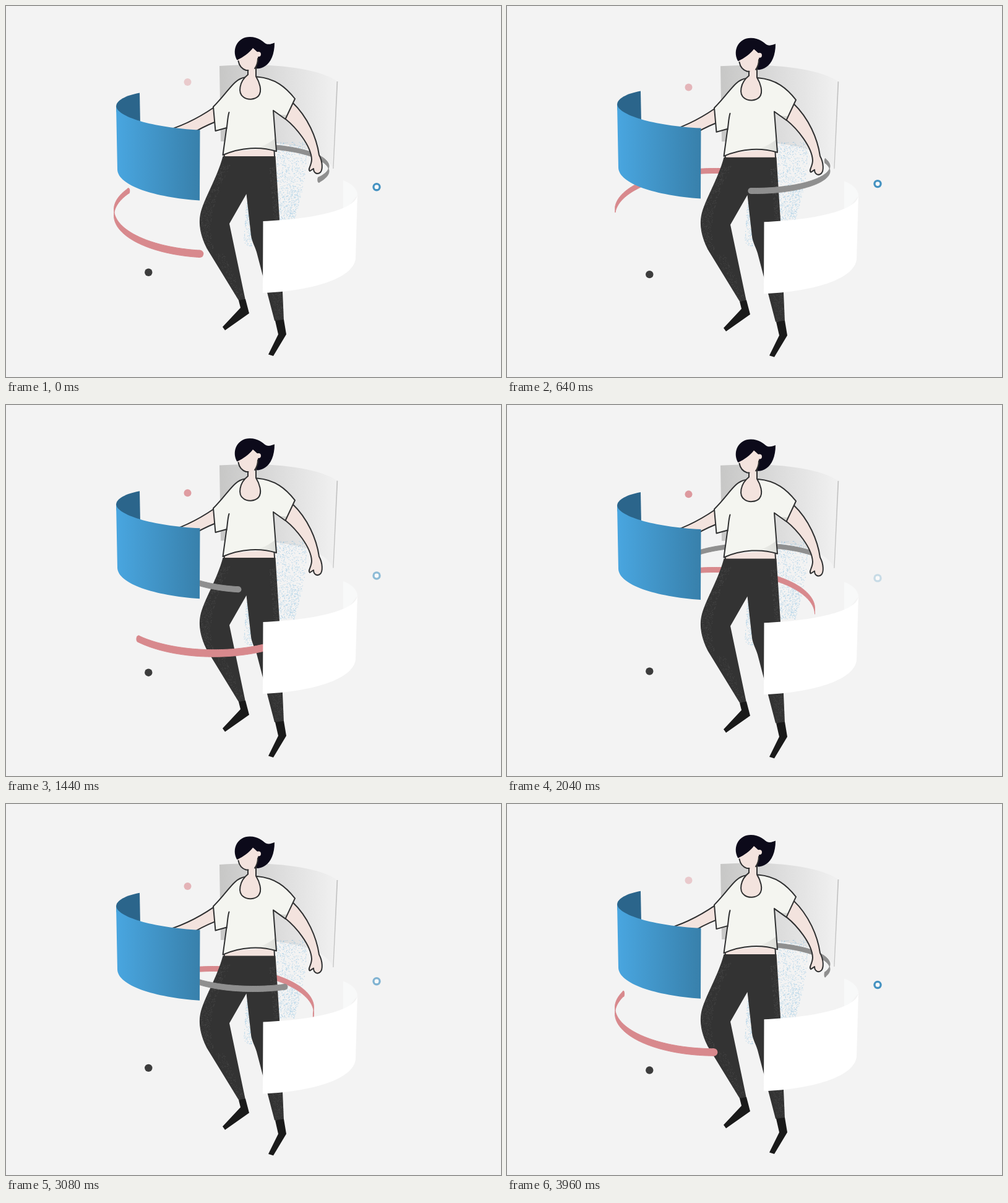
Recreate the animation shown at these times as an HTML page with a canvas. Size 800x600 px, loop 4 s.

```html
<!DOCTYPE html>
<html lang="en">
<head>
<meta charset="utf-8">
<title>Floating figure</title>
<style>
html, body { margin: 0; width: 100%; height: 100%; overflow: hidden; background: #f3f3f3; }
canvas { display: block; }
</style>
</head>
<body>
<canvas id="stage" width="800" height="600"></canvas>
<script>
const ctx = document.getElementById('stage').getContext('2d');
const LOOP = 4000, INK = '#2f3031', SKIN = '#f3e3de', BACKDROP = '#f3f3f3';

const shapes = Object.fromEntries(Object.entries({
  panel: 'M345 97C420 92 500 98 536 122L529 263C516 233 460 216 347 219Z',
  panelEdge: 'M534.5 122L536.3 122L529.5 263L528.3 263Z',
  blueInner: 'M216 141C194 145 178 153 178 163L178.5 172L217 192Z',
  blueOuter: 'M178 162C178 179 236 197.5 313.5 201L313 315C240 310 181 291 180 265Z',
  whiteInner: 'M545 282C556 286 568 294 568 306L545 335Z',
  whiteOuter: 'M415.5 348C490 345 568 331 568 304L565 408C562 442 490 461 415 464Z',
  leftArm: 'M250 204C290 194 320 175 336 164L339 187C322 194 310 200 298 208',
  rightArm: 'M463 156C488 180 502 213 506 241C512 252 512 265 508 269C504 273 497 271 497 263L491 267C487 264 494 258 494 248C493 225 468 196 452 183',
  belly: 'M352 236L353 244L434 244L433 230Z',
  bellySides: 'M352 238L353 243M434 243L433.5 234',
  pants: 'M350.5 243L435.5 243L442 345L449 509L434 509L405 398C402 388 397 380 396 371L388.5 304L361 352L387 476L376 476L327 396C314 374 311 352 314 337C319 313 341 279 350.5 243Z',
  feet: 'M376 476L387 474L393 497L354 524.5L350 519L379 488ZM435 509L449 507L453 531L432 566L424 563.5L440 531Z',
  shirt: 'M386 115.5C368 118 360 138 335 163L338.5 202L356.5 197L350.5 241C380 228 412 227 437 235L432 169L451.5 183L467 150C452 131 435 117 406 114.5Z',
  crease: 'M360.5 172C358 180 358 190 356.5 198',
  sleeveShade: 'M432 168L451 182L454 176Q440 178 432 168Z',
  hemShade: 'M408 229Q427 222 436 213L437 235Q422 230 408 229Z',
  neck: 'M391 101L391 111C377 122 374 141 384 147.5C390 152 402 152 408 145.5C415 137 409 122 404 114L404 99Z',
  hair: 'M373 87C364 69 375 50 394 50C408 50 414 57 420 61C425 63 430 61 434 59.5C434 78 428 91 419 97C413 101 408 102 404 101L390 90Z',
  face: 'M374.5 87C383 83 393 76 399 68C402 70 404 73 407 75C408 88 406 96 402 101C398 104 393 105 388 104C381 101 376 96 374.5 87Z',
  jaw: 'M375.5 89C377 97 382 102 388 104L391.5 104M407 85C407 90 405 97 402 101'
}).map(([name, d]) => [name, new Path2D(d)]));

const pinkRing = { cx: 336, cy: 334, rx: 161.5, ry: 67.5, front: 12.5, back: 9, color: '#d8898d' };
const grayRing = { cx: 400, cy: 263, rx: 122, ry: 36, front: 10, back: 8, color: '#8f8f8f' };
const ARC = 113;

// Swings linearly between two values, reached at the given times of the loop.
function swing(t, lowAt, low, highAt, high) {
  const rise = (highAt - lowAt + LOOP) % LOOP, since = (t - lowAt + LOOP) % LOOP;
  const u = since < rise ? since / rise : (LOOP - since) / (LOOP - rise);
  return low + (high - low) * u;
}

// Leading angle of each ring: two accelerating laps and three eased laps.
const grayLead = u => 30 + 720 * u ** (4 / 3);
const pinkLead = u => 211 + 1080 * (u - .07 * Math.sin(2 * Math.PI * u) - .044 * Math.sin(Math.PI * u));

function gradient(x0, x1, ...colors) {
  const g = ctx.createLinearGradient(x0, 0, x1, 0);
  colors.forEach((c, i) => g.addColorStop(i / (colors.length - 1), c));
  return g;
}
const panelFill = gradient(345, 536, '#c7c7c6', '#dcdcdc', '#f1f1f1');
const blueFill = gradient(178, 313, '#49a6e0', '#3880ab');
const hemFill = gradient(408, 437, '#f0f1ec', '#dcddd9');

let seed = 7;
function random() {
  seed = (seed * 16807) % 2147483647;
  return seed / 2147483647;
}
// Dots in a band whose left edge and width depend on the height.
function scatter(count, top, bottom, left, width) {
  const dots = new Path2D();
  for (let i = 0; i < count; i++) {
    const v = random();
    dots.rect(left(v) + width(v) * random(), top + (bottom - top) * v, 1, 1);
  }
  return dots;
}
const blueGrain = [
  scatter(850, 220, 346, () => 437, v => 50 - 22 * v * v),
  scatter(150, 318, 388, v => 388 - 5 * v, v => 4 + 11 * v)
];
const pantsGrain = [
  scatter(420, 256, 400, v => 345 - 32 * Math.sin(v * 2.2), () => 18),
  scatter(170, 260, 346, v => 425 + 8 * v, () => 10),
  scatter(130, 400, 474, v => 338 + 34 * v, () => 14),
  scatter(130, 462, 506, v => 428 + 8 * v, () => 16)
];

function fill(shape, color) {
  ctx.fillStyle = color;
  ctx.fill(shapes[shape]);
}
function outline(shape, color) {
  if (color) fill(shape, color);
  ctx.stroke(shapes[shape]);
}
function sprinkle(grain, color) {
  ctx.fillStyle = color;
  grain.forEach(dots => ctx.fill(dots));
}
function shifted(y, paint) {
  ctx.save();
  ctx.translate(0, y);
  paint();
  ctx.restore();
}
function circle(x, y, r, color, alpha = 1) {
  ctx.globalAlpha = Math.min(1, alpha);
  ctx.fillStyle = color;
  ctx.beginPath();
  ctx.arc(x, y, r, 0, 7);
  ctx.fill();
  ctx.globalAlpha = 1;
}

// A vertical ribbon along an ellipse; one call paints its near or far half.
function ribbon(ring, lead, near) {
  const points = [];
  for (let i = 0; i <= 90; i++) {
    const a = (lead - ARC * i / 90) * Math.PI / 180, s = Math.sin(a);
    points.push({
      x: ring.cx + ring.rx * Math.cos(a),
      y: ring.cy + ring.ry * s,
      half: (ring.front + ring.back + (ring.front - ring.back) * s) / 4,
      turn: Math.abs(s)
    });
  }
  ctx.save();
  ctx.beginPath();
  ctx.rect(0, near ? ring.cy : 0, 800, near ? 600 : ring.cy);
  ctx.clip();
  ctx.fillStyle = ctx.strokeStyle = ring.color;
  ctx.lineWidth = 1;
  ctx.beginPath();
  points.forEach(p => ctx.lineTo(p.x, p.y - p.half + .5));
  points.reverse().forEach(p => ctx.lineTo(p.x, p.y + p.half - .5));
  ctx.closePath();
  ctx.fill();
  ctx.stroke();
  for (const p of [points[0], points[90]]) {
    ctx.beginPath();
    ctx.ellipse(p.x, p.y, p.half * p.turn, p.half, 0, 0, 7);
    ctx.fill();
  }
  ctx.restore();
}

function drawBody() {
  ctx.strokeStyle = INK;
  ctx.lineWidth = 2;
  ctx.lineJoin = ctx.lineCap = 'round';
  outline('leftArm', SKIN);
  fill('belly', SKIN);
  outline('bellySides');
  fill('pants', '#333333');
  ctx.save();
  ctx.clip(shapes.pants);
  sprinkle(pantsGrain, '#464646');
  ctx.restore();
  fill('feet', '#1a1a1a');
  outline('rightArm', SKIN);
  fill('shirt', '#f4f5f0');
  fill('sleeveShade', '#d3d4d0');
  fill('hemShade', hemFill);
  outline('shirt');
  outline('crease');
  fill('hair', '#0c0a1a');
  outline('neck', SKIN);
  fill('face', SKIN);
  outline('jaw');
  circle(408, 78, 4, SKIN);
}

function draw(t) {
  const pink = pinkLead(t / LOOP), gray = grayLead(t / LOOP);
  const whiteShift = swing(t, 0, 0, 2800, 5.8);

  ctx.fillStyle = BACKDROP;
  ctx.fillRect(0, 0, 800, 600);
  shifted(whiteShift * .2, () => {
    fill('panel', panelFill);
    fill('panelEdge', '#c3c3c3');
  });
  sprinkle(blueGrain, 'rgba(105,175,220,.5)');

  ribbon(pinkRing, pink, false);
  ribbon(grayRing, gray, false);
  shifted(swing(t, 0, 0, 2000, 5.6), drawBody);
  ribbon(pinkRing, pink, true);
  ribbon(grayRing, gray, true);

  shifted(whiteShift, () => {
    fill('whiteInner', '#f8f9f9');
    fill('whiteOuter', '#ffffff');
  });
  shifted(swing(t, 700, -3.8, 3250, 3.3), () => {
    fill('blueInner', '#2b658b');
    fill('blueOuter', blueFill);
  });

  const ringY = swing(t, 1440, 276, 200, 294);
  circle(230.3, swing(t, 3200, 426.5, 800, 435), 6.2, '#3c3c3c');
  circle(293.5, swing(t, 0, 123, 1800, 147), 6, '#da8c92', swing(t, 0, .4, 1750, .95));
  circle(599, ringY, 6.7, '#4492c1', swing(t, 2100, .22, 300, 1.2));
  circle(599, ringY, 3.4, '#fafafa');
}

function frame() {
  draw(performance.now() % LOOP);
  requestAnimationFrame(frame);
}
frame();
</script>
</body>
</html>
```
